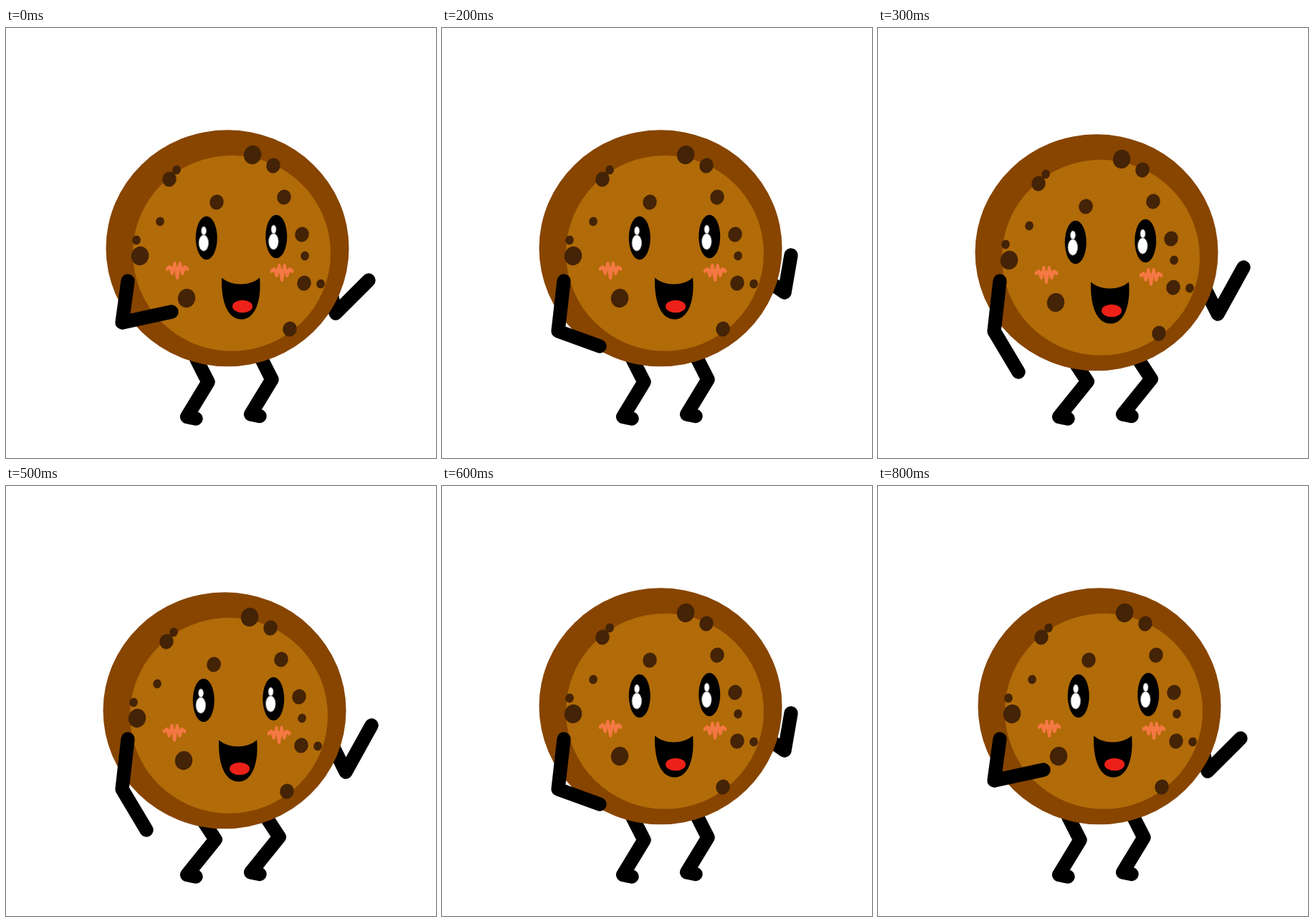
These frames come from a looping animation (600x600 px, 900 ms). An HTML page:

```html
<!DOCTYPE html>
<html lang="en">
<head>
<meta charset="utf-8">
<title>Dancing cookie</title>
<style>
  html, body { margin: 0; width: 100%; height: 100%; overflow: hidden; background: #fff; }
  svg { display: block; width: 100%; height: 100%; }
  .limb { fill: none; stroke: #000; stroke-width: 19.3; stroke-linecap: round; stroke-linejoin: round; }
  .blush { fill: none; stroke: #f47843; stroke-width: 4; stroke-linecap: round; stroke-linejoin: round; }
</style>
</head>
<body>
<svg viewBox="0 0 600 600">
  <g class="limb">
    <path id="leg"/>
    <use href="#leg" x="89" y="-3.5"/>
    <path id="rightArm"/>
  </g>
  <g id="body">
    <ellipse cx="305" cy="307.3" rx="169.5" ry="165" fill="#874500"/>
    <ellipse cx="311" cy="314.3" rx="138" ry="136.5" fill="#b16b08"/>
    <g id="chips" fill="#442306"/>
    <g id="eye">
      <ellipse cx="275.7" cy="293" rx="15" ry="30.3"/>
      <g fill="#fff" stroke="#888" stroke-width=".8">
        <ellipse cx="272" cy="283" rx="3.5" ry="6"/>
        <ellipse cx="271.8" cy="300" rx="6.8" ry="11.2"/>
      </g>
    </g>
    <use href="#eye" x="97.5" y="-2"/>
    <path d="M297 348.5C311 360.500 336 360.500 350 348.5C353 381 343 406.5 325 406.5C305 406.5 296 382 297 348.5Z"/>
    <ellipse cx="326" cy="388.5" rx="14" ry="8.8" fill="#ee2119"/>
    <path id="blush" class="blush"/>
    <use href="#blush" x="146" y="3"/>
  </g>
  <path id="leftArm" class="limb"/>
</svg>
<script>
const byId = id => document.getElementById(id);
const setPath = (id, ...points) => byId(id).setAttribute("d", "M" + points.join("L"));

// Chip centres grouped by radius; every chip is a slightly tall, tilted oval.
const chips = {
  12.5: ["340 177", "183 318", "248 377"],
  10: ["369 192", "224 211", "290 243", "384 236", "409 288", "412 356", "392 420"],
  6: ["234 198", "211 270", "413 318", "178 296", "435 357"]
};
byId("chips").innerHTML = Object.entries(chips).flatMap(([r, centres]) => centres.map(centre =>
  `<ellipse rx="${r * 0.97}" ry="${r * 1.06}" transform="translate(${centre}) rotate(15)"/>`)).join("");

// A scribble: a zigzag that is tallest in the middle, crossed by one flat stroke.
const scribble = Array.from({ length: 9 }, (_, i) => {
  const x = 4 * (i - 4);
  const height = 13 * (1 - Math.abs(x) / 17) * (i % 2 ? -0.8 : 1);
  return [235 + x * 0.9, 336 + height];
});
setPath("blush", ...scribble, [249, 335], [221, 335]);

// Arm key points; crouch 0..1 bends the knees and lowers the body.
const poses = {
  lean: { sway: 4, crouch: 0, left: [[162, 411], [231, 396]], right: [[460, 398], [506, 352]] },
  swing: { sway: 2, crouch: 0, left: [[162, 423], [206, 471]], right: [[470, 400], [514, 345]] },
  raise: { sway: 0, crouch: 0, left: [[162, 423], [220, 444]], right: [[478, 369], [487, 317]] },
  dip: { sway: 0, crouch: 0.5, left: [[162, 423], [196, 480]], right: [[474, 399], [510, 334]] },
  squat: { sway: -14, crouch: 1, left: [[158, 423], [181, 480]], right: [[474, 399], [527, 370]] }
};
const dance = ["lean", "swing", "raise", "dip", "squat"];
const STEP = 100, LAST = dance.length - 1;

function drawLeg(crouch) {
  const bend = crouch ** 3;
  const kneeX = 282 + 18 * crouch + 5 * crouch ** 2, kneeY = 494 - 6 * bend;
  const angle = (63 - 50 * bend) * Math.PI / 180, thigh = 36 + 26 * bend;
  const hip = [kneeX - thigh * Math.cos(angle), kneeY - thigh * Math.sin(angle)];
  setPath("leg", hip, [kneeX, kneeY], [252.5, 542.5], [265, 545]);
}

function draw(time) {
  // The dance runs to the squat and back again, pose by pose.
  const step = Math.floor(time / STEP) % (2 * LAST + 1);
  const { sway, crouch, left, right } = poses[dance[LAST - Math.abs(LAST - step)]];
  const drop = 13 * crouch - 2 * crouch ** 2;
  byId("body").setAttribute("transform", `translate(${sway} ${drop})`);
  setPath("leftArm", [170, 353], ...left);
  setPath("rightArm", [449, 349], ...right);
  drawLeg(crouch);
}

const start = performance.now();
function tick() {
  draw(performance.now() - start);
  requestAnimationFrame(tick);
}
tick();
</script>
</body>
</html>
```
